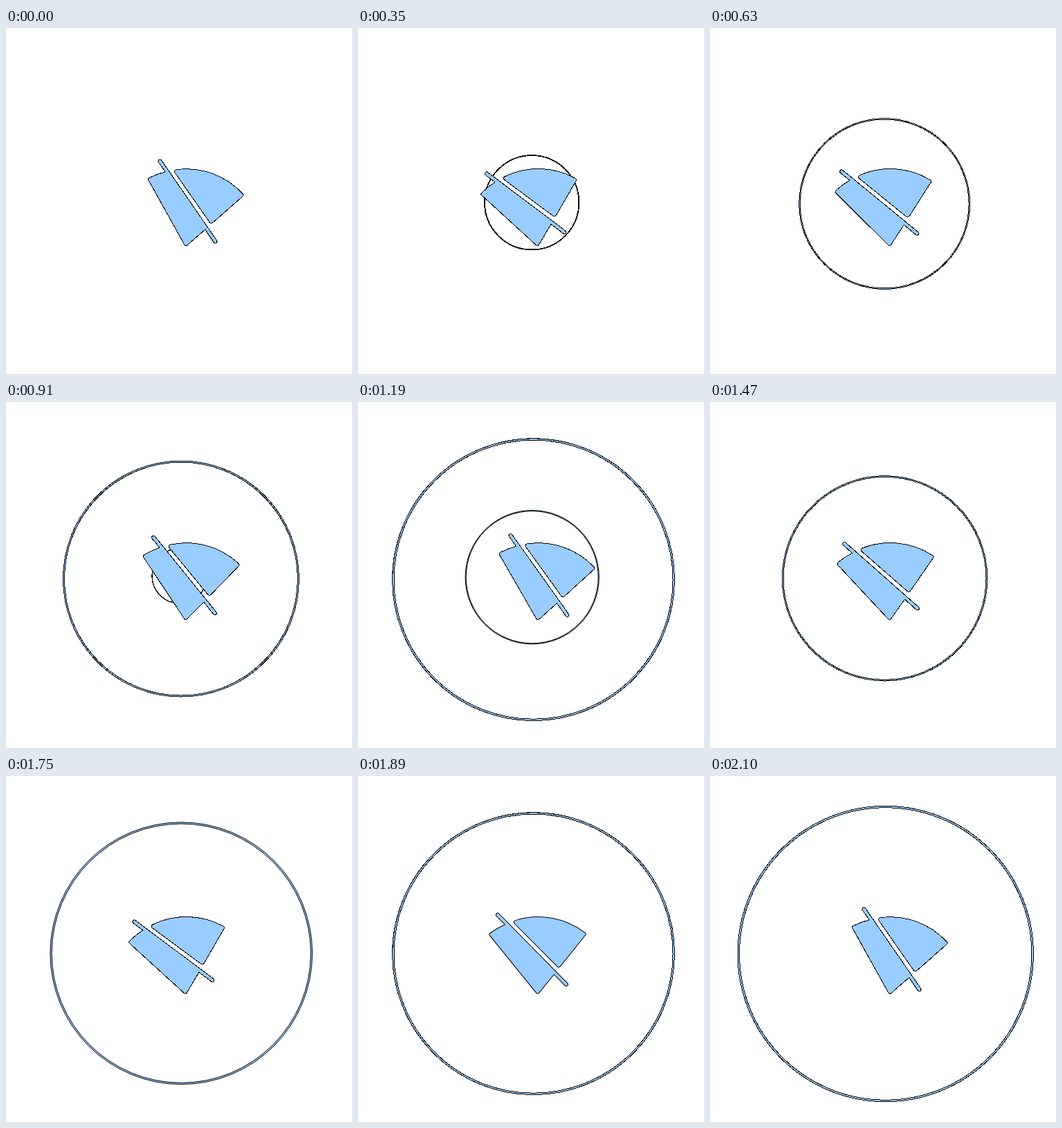
An HTML page for the animation above (2.17 s loop, 500 by 500 pixels).

```html
<!DOCTYPE html>
<html lang="en">
<head>
<meta charset="utf-8">
<title>Signal off</title>
<style>
  html, body { margin: 0; width: 100%; height: 100%; overflow: hidden; background: #fff; }
  svg { display: block; width: 100vw; height: 100vh; }
  path { fill: #9cf; stroke: #000; stroke-width: 1; stroke-linejoin: round; shape-rendering: crispEdges; }
  .ring { fill-rule: evenodd; vector-effect: non-scaling-stroke; }
</style>
</head>
<body>
<svg viewBox="0 0 500 500">
  <path class="ring"/>
  <path class="ring"/>
  <g id="icon">
    <path d="M244.1 209Q242.4 205.4 246.4 204.7A111 111 0 0 1 341.8 239.2Q344.2 241.5 342.3 243L299.2 281Q296.6 283.2 294.4 281Z"/>
    <path d="M207.5 216.3A111 111 0 0 1 230.2 208L220.4 193.9A2.5 2.5 0 0 1 224.6 191.1L304.6 307.1A2.5 2.5 0 0 1 300.4 309.9L287.8 291.3L262 313.6Q259.3 316 257.6 312.8L206 220Q204.5 217.8 207.5 216.3Z"/>
  </g>
</svg>
<script>
  const LOOP = 2170, STEP = 70;
  const GROW = 1400, RING_STARTS = [0, 700];
  const SWING = [[0, 0], [428, -20.2], [1120, 0], [1676, -20.2], [2100, 0]];

  const icon = document.getElementById('icon');
  const rings = [...document.querySelectorAll('.ring')];

  const circle = (cx, cy, r) =>
    `M${cx - r} ${cy}a${r} ${r} 0 1 1 ${2 * r} 0a${r} ${r} 0 1 1 ${-2 * r} 0Z`;
  rings.forEach(ring =>
    ring.setAttribute('d', circle(3.7, 7, 213.7) + circle(3.7, 7, 211.2)));

  const bez = (s, a, b) => 3 * (1 - s) ** 2 * s * a + 3 * (1 - s) * s * s * b + s ** 3;

  // Linear start, soft landing
  function easeGrow(x) {
    let lo = 0, hi = 1;
    for (let i = 0; i < 24; i++) {
      const mid = (lo + hi) / 2;
      if (bez(mid, 0.167, 0.667) < x) lo = mid; else hi = mid;
    }
    return bez(hi, 0.167, 1);
  }

  function swingAt(t) {
    const i = SWING.findIndex(([time]) => time > t);
    if (i < 0) return 0;
    const [t0, a] = SWING[i - 1], [t1, b] = SWING[i];
    const x = (t - t0) / (t1 - t0);
    return a + (b - a) * x * x * (3 - 2 * x);
  }

  function draw(t) {
    icon.setAttribute('transform', `rotate(${swingAt(t)} 259.5 314.5)`);
    rings.forEach((ring, i) => {
      const age = t - RING_STARTS[i];
      const shown = age > 0 && age <= GROW;
      ring.setAttribute('visibility', shown ? 'visible' : 'hidden');
      if (shown) ring.setAttribute('transform', `translate(250 250) scale(${easeGrow(age / GROW)})`);
    });
  }

  const start = performance.now();
  function tick() {
    const t = (performance.now() - start) % LOOP;
    draw(Math.floor(t / STEP) * STEP);
    requestAnimationFrame(tick);
  }
  tick();
</script>
</body>
</html>
```
